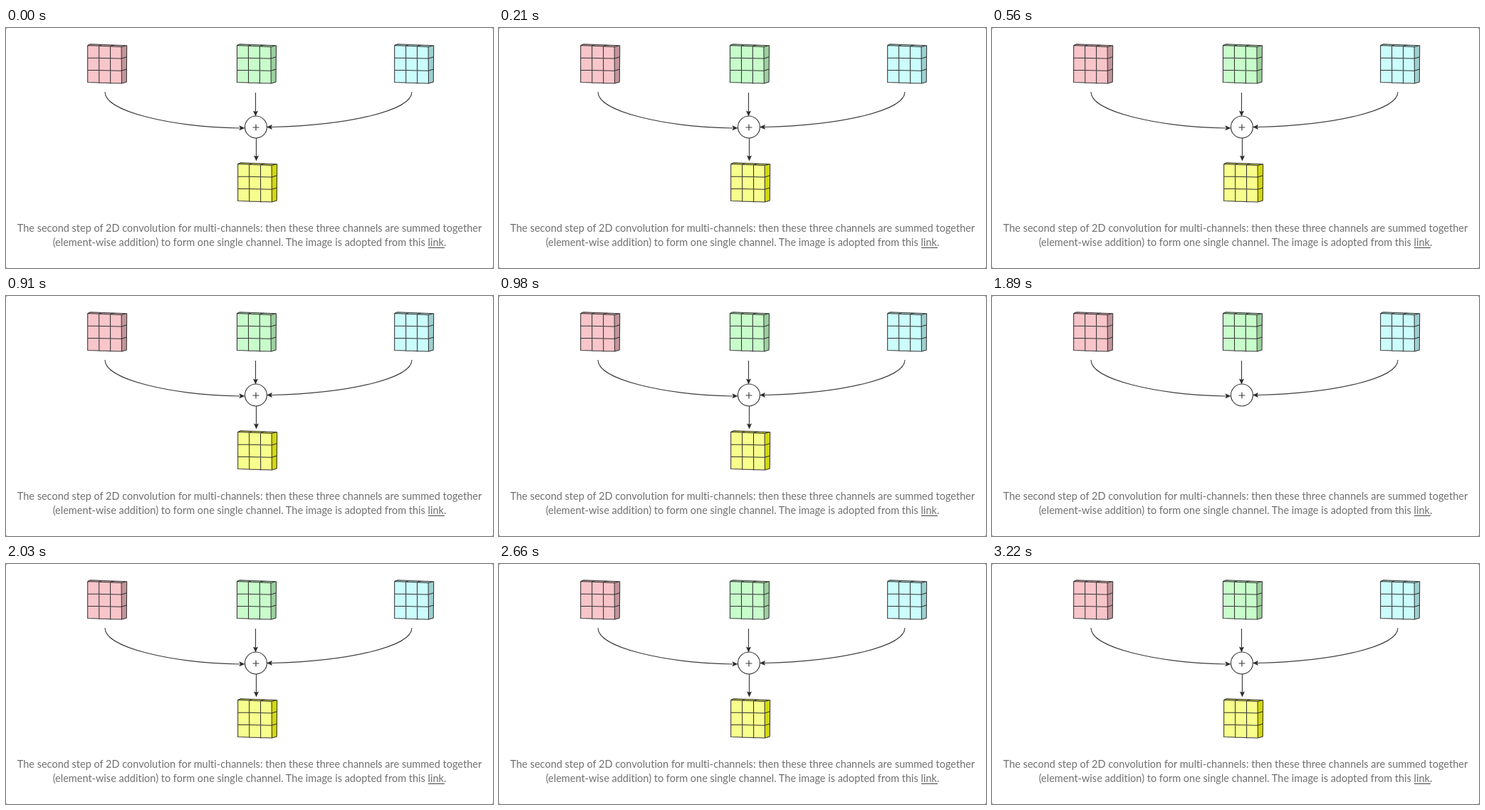
Write an HTML page that moves like this. It is 684 px wide and 338 px high and loops after 3.29 s.

```html
<!DOCTYPE html>
<html lang="en">
<head>
<meta charset="utf-8">
<title>Channel sum</title>
<style>
  html, body { margin: 0; width: 100%; height: 100%; overflow: hidden; background: #8a8a8a; }
  svg { display: block; width: 684px; height: 338px; }
  .ink { fill: none; stroke: #333; stroke-width: 1.05; stroke-linejoin: round; stroke-linecap: round; }
  .wire { fill: none; stroke: #3a3a3a; stroke-width: 1.15; }
  .head { fill: #2b2b2b; }
  text {
    font: 14.5px Lato, "Open Sans", sans-serif; font-variant-ligatures: none;
    fill: #707070; text-anchor: middle;
  }
</style>
</head>
<body>
<svg viewBox="0 0 684 338">
  <rect width="684" height="338" rx="2.5" fill="#fff"/>
  <g id="inputs"></g>
  <g id="sum">
    <path class="wire" d="M139 90C139 118 232 139 328 141M350.5 91V118M570 90C570 117 478 137 373 139.5"/>
    <circle class="wire" cx="351" cy="139.5" r="15.5"/>
    <path class="wire" d="M346.5 140H355.5M351 135.5V144.5"/>
  </g>
  <g id="output">
    <path class="wire" d="M351.5 155V181"/>
  </g>
  <text x="342" y="287">The second step of 2D convolution for multi-channels: then these three channels are summed together</text>
  <text x="342" y="307">(element-wise addition) to form one single channel. The image is adopted from this link.</text>
  <path d="M593 309.5H616" stroke="#444" stroke-width="1"/>
</svg>
<script>
const NS = "http://www.w3.org/2000/svg";
const byId = id => document.getElementById(id);
const LOOP = 3290, CLEAR = 1050, SUM = 1540, OUTPUT = 2025;

function add(parent, tag, attrs) {
  const el = document.createElementNS(NS, tag);
  for (const key in attrs) el.setAttribute(key, attrs[key]);
  return parent.appendChild(el);
}

// A 3 x 3 slab: front face, thin top face and narrow right face.
function slab(parent, x, y, front, top, side) {
  const g = add(parent, "g", { transform: `translate(${x} ${y})` });
  const topFace = "M0 1.7L4 0L55 2L47.4 3.6Z";
  const sideFace = "M47.4 3.6L55 2L54.6 53.2L47.8 55.2Z";
  const frontFace = "M0 1.7L47.4 3.6L47.8 55.2L0 53.7Z";
  add(g, "path", { d: topFace, fill: top });
  add(g, "path", { d: sideFace, fill: side });
  add(g, "path", { d: frontFace, fill: front });
  let lines = topFace + sideFace + frontFace;
  for (const k of [1, 2]) {
    const cx = 15.9 * k, cy = 1.7 + 17.4 * k, edge = 1.7 + 0.6 * k;
    lines += `M${cx} ${edge}l.2 52.2M${cx} ${edge}l5 -1.7`;
    lines += `M0 ${cy}l47.5 1l7.3 -2.2`;
  }
  add(g, "path", { d: lines, class: "ink" });
}

function head(parent, x, y, angle) {
  add(parent, "path", {
    class: "head", d: "M0 0L-8 -3.5L-6.6 0L-8 3.5Z",
    transform: `translate(${x} ${y}) rotate(${angle})`
  });
}

slab(byId("inputs"), 114.7, 22.8, "#f8c5ca", "#d5a3a9", "#c3959b");
slab(byId("inputs"), 324.5, 22.8, "#c8fdcb", "#a8dcab", "#9bd09f");
slab(byId("inputs"), 545.7, 22.8, "#cbfdfd", "#a9dcdc", "#9dd0d0");
slab(byId("output"), 325.7, 189.8, "#f8fe8c", "#d2d63c", "#d3d80c");
head(byId("sum"), 335.5, 141, 1);
head(byId("sum"), 350.5, 124.5, 90);
head(byId("sum"), 366, 139.5, 180);
head(byId("output"), 351.5, 187.5, 90);

function show(id, on) {
  byId(id).setAttribute("visibility", on ? "visible" : "hidden");
}

function draw(now) {
  const t = now % LOOP;
  show("sum", t < CLEAR || t >= SUM);
  show("output", t < CLEAR || t >= OUTPUT);
}

const start = performance.now();
function tick() {
  draw(performance.now() - start);
  requestAnimationFrame(tick);
}
tick();
</script>
</body>
</html>
```
